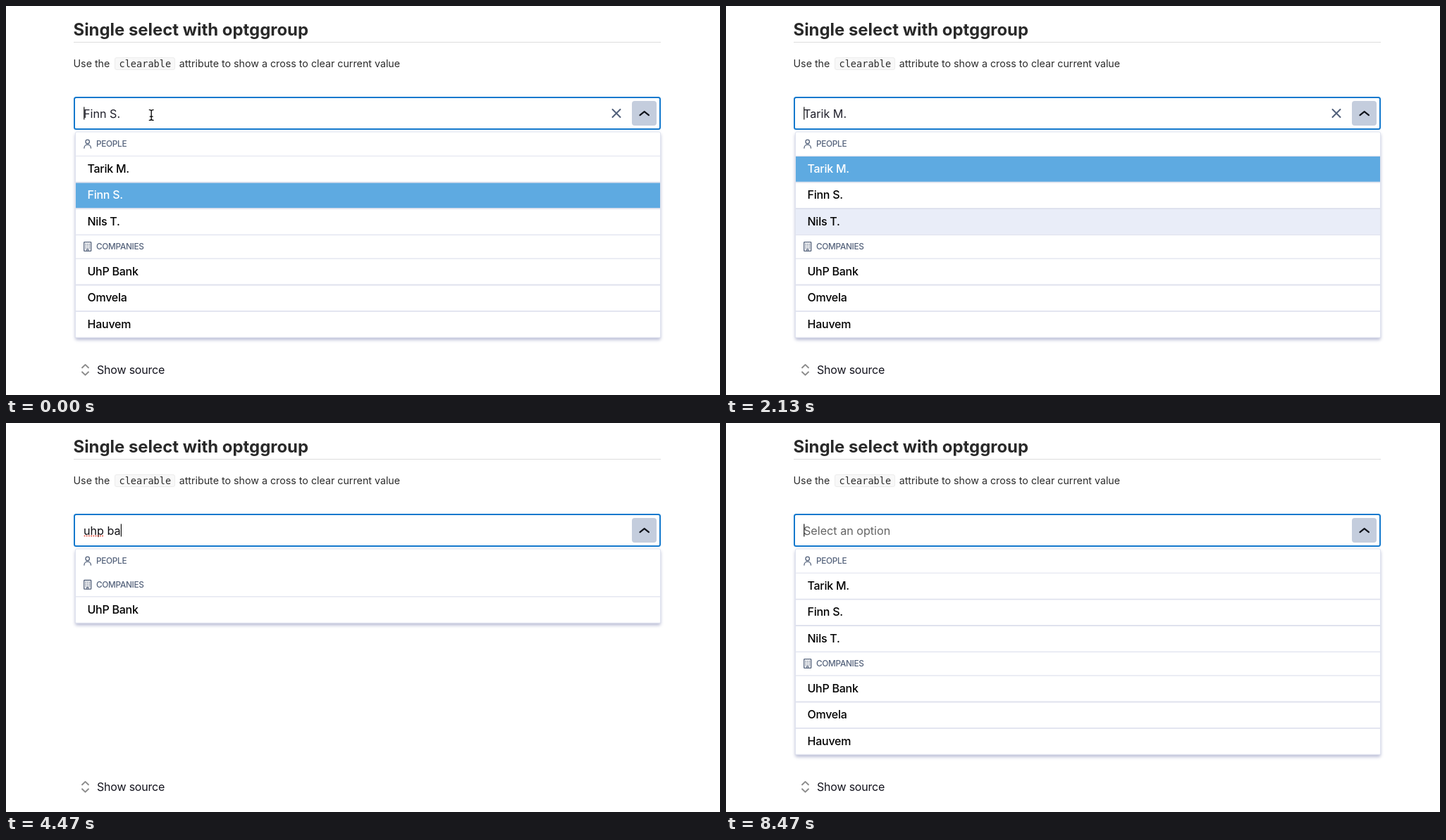
An HTML page for the animation above (8590 ms loop, 1013 by 553 pixels).

```html
<!DOCTYPE html>
<html lang="en">
<head>
<meta charset="utf-8">
<title>Single select</title>
<style>
  html, body { margin: 0; width: 100%; height: 100%; overflow: hidden; background: #fff; }
  svg { display: block; width: 1013px; height: 553px; font: 16px Inter, sans-serif; }
  text { white-space: pre; }
  .line { fill: none; stroke-linecap: round; stroke-linejoin: round; }
  .field { font-size: 16.15px; }
  .option { letter-spacing: -.25px; font-weight: 450; }
  .group { font-size: 11.8px; font-weight: 500; letter-spacing: -.3px; fill: #55637c; }
  .panel { fill: #fff; stroke: #dfe3ef; filter: drop-shadow(0 3px 2px rgba(55, 65, 135, .33)); }
</style>
</head>
<body>
<svg viewBox="0 0 1013 553">
  <text x="95.5" y="42" font-size="23.9" font-weight="700" fill="#292929">Single select with optggroup</text>
  <path d="M96 51.5H929" stroke="#dcdcdc"/>
  <g font-size="14.26" fill="#2b2b2b">
    <text x="95.5" y="87">Use the</text>
    <rect x="154.5" y="73.5" width="85" height="17" rx="2.5" fill="#f8f8f8" stroke="#ececec"/>
    <text x="160.5" y="87" font-size="13.6" style="font-family:'DejaVu Sans Mono',monospace">clearable</text>
    <text x="245.7" y="87">attribute to show a cross to clear current value</text>
  </g>
  <rect x="97" y="130" width="831" height="45" rx="2.5" fill="#fff" stroke="#1479cd" stroke-width="2"/>
  <rect x="888" y="135" width="35" height="35" rx="4" fill="#c4cddd"/>
  <path class="line" d="M108 514.2l4.5-4.3 4.5 4.3M108 520.3l4.5 4.3 4.5-4.3" stroke="#8b8b8b" stroke-width="1.9"/>
  <text x="129" y="522.7" letter-spacing="-.2" fill="#14141e">Show source</text>
  <g id="ui"></g>
</svg>
<script>
const LOOP = 8590, HEADER = 33.7, ROW = 37.4, TOP = 179.5;
const ui = document.getElementById('ui');
const people = ['Tarik M.', 'Finn S.', 'Nils T.'];
const companies = ['UhP Bank', 'Omvela', 'Hauvem'];
const [first, second, third] = people, bank = companies[0];

// Each step changes some of the state and keeps the rest.
const steps = [
  [0, { value: second, open: true, beam: true, hover: '', query: '' }],
  [270, { hover: first, beam: false }],
  [870, { value: first, open: false, hover: '' }],
  [1530, { open: true }],
  [1870, { hover: second }],
  [2000, { hover: third }],
  [2330, { hover: bank }],
  [2670, { value: bank, open: false, hover: '' }],
  [2930, { value: '', open: true }],
  [3670, { query: 'u' }],
  [3800, { query: 'uh' }],
  [4000, { query: 'uhp' }],
  [4130, { query: 'uhp ' }],
  [4330, { query: 'uhp b' }],
  [4470, { query: 'uhp ba' }],
  [4600, { query: 'uhp ban' }],
  [4670, { query: 'uhp bank' }],
  [5000, { hover: bank }],
  [5470, { value: bank, query: '', open: false, hover: '' }],
  [6530, { value: '', open: true }],
];

function caretOn(t) {
  if (t >= 3670 && t < 5470) return t < 5000;
  const start = t < 3670 ? -30 : 5470;
  return (t - start) % 1000 < 500;
}

const stroke = (d, color, width) =>
  `<path class="line" d="${d}" stroke="${color}" stroke-width="${width}"/>`;

const personIcon = y =>
  `<circle cx="115.7" cy="${y - 3.2}" r="2.7" fill="none" stroke="#55637c" stroke-width="1.3"/>` +
  stroke(`M110.9 ${y + 6}c0-6.6 9.6-6.6 9.6 0`, '#55637c', 1.3);

const buildingIcon = y =>
  `<rect x="110.7" y="${y - 6.3}" width="10" height="12.6" rx=".6" fill="none" stroke="#55637c" stroke-width="1.3"/>` +
  [-3.4, -.8, 1.8].map(dy =>
    `<path d="M112.6 ${y + dy}h6.6" stroke="#55637c" stroke-width="1.3" stroke-dasharray="1.4 1.2"/>`).join('') +
  stroke(`M114.6 ${y + 6}v-2.2h2.2v2.2`, '#55637c', 1.1);

function panel({ value, hover, query }) {
  let y = TOP, rows = '';
  const divider = width => `<path d="M99 ${y}H928" stroke="#dfe2ee" stroke-width="${width}"/>`;

  const group = (label, icon, names) => {
    const middle = y + 16.6;
    rows += icon(middle) + `<text class="group" x="128" y="${middle + 4.2}">${label}</text>`;
    y += HEADER;
    const shown = names.filter(name => name.toLowerCase().includes(query));
    shown.forEach((name, i) => {
      const selected = name === value;
      const fill = selected ? '#5eaae1' : name === hover ? '#e9edf8' : '#fff';
      rows += `<rect x="99" y="${y + .5}" width="829" height="36.3" fill="${fill}"/>` +
        divider(i ? 1.9 : 1.1) +
        `<text class="option" x="115.5" y="${y + 23.7}" fill="${selected ? '#fff' : '#000'}">${name}</text>`;
      y += ROW;
    });
    if (shown.length) rows += divider(1.1);
  };

  group('PEOPLE', personIcon, people);
  group('COMPANIES', buildingIcon, companies);
  return `<rect class="panel" x="98.5" y="${TOP - .5}" width="830" height="${y - TOP + .5}" rx="2"/>` + rows;
}

const beam = () => {
  const d = 'M203.3 147.6q2.7 0 2.9 1.6q.2-1.6 2.9-1.6M206.2 149V161M203.3 162.4q2.7 0 2.9-1.6q.2 1.6 2.9 1.6M204.3 157.2h3.8';
  return stroke(d, '#fff', 3) + stroke(d, '#000', 1.3);
};

function render(state, caret) {
  const { value, query, open } = state;
  const content = query || value || 'Select an option';
  const color = query ? '#101014' : value ? '#20202b' : '#646464';
  ui.innerHTML = (open ? panel(state) : '') +
    `<text id="field" class="field" x="110" y="158.7" fill="${color}">${content}</text>` +
    (value ? stroke('M860.5 147l11 11m0-11l-11 11', '#505f7a', 2) : '') +
    stroke(open ? 'M899.5 155.2l6.2-5 6.2 5' : 'M899.5 150.4l6.2 5 6.2-5', '#10131a', 2.2) +
    (state.beam ? beam() : '');

  const field = document.getElementById('field');
  let marks = '';
  if (query.includes(' ')) {
    const end = 110 + field.getSubStringLength(0, query.indexOf(' '));
    marks += `<path class="line" d="M111.5 160.6H${end - .5}" stroke="#e8503f" stroke-width="2" stroke-dasharray="0 3.2"/>`;
  }
  if (caret) {
    const x = 110.8 + (query ? field.getComputedTextLength() : 0);
    marks += `<path d="M${x} 143.5V161.5" stroke="#111" stroke-width="1.2"/>`;
  }
  ui.insertAdjacentHTML('beforeend', marks);
}

let shownKey = '';
function frame() {
  const t = performance.now() % LOOP;
  const past = steps.filter(([time]) => time <= t);
  const caret = caretOn(t), key = past.length + '/' + caret;
  if (key !== shownKey) {
    render(Object.assign({}, ...past.map(([, change]) => change)), caret);
    shownKey = key;
  }
  requestAnimationFrame(frame);
}
frame();
</script>
</body>
</html>
```
